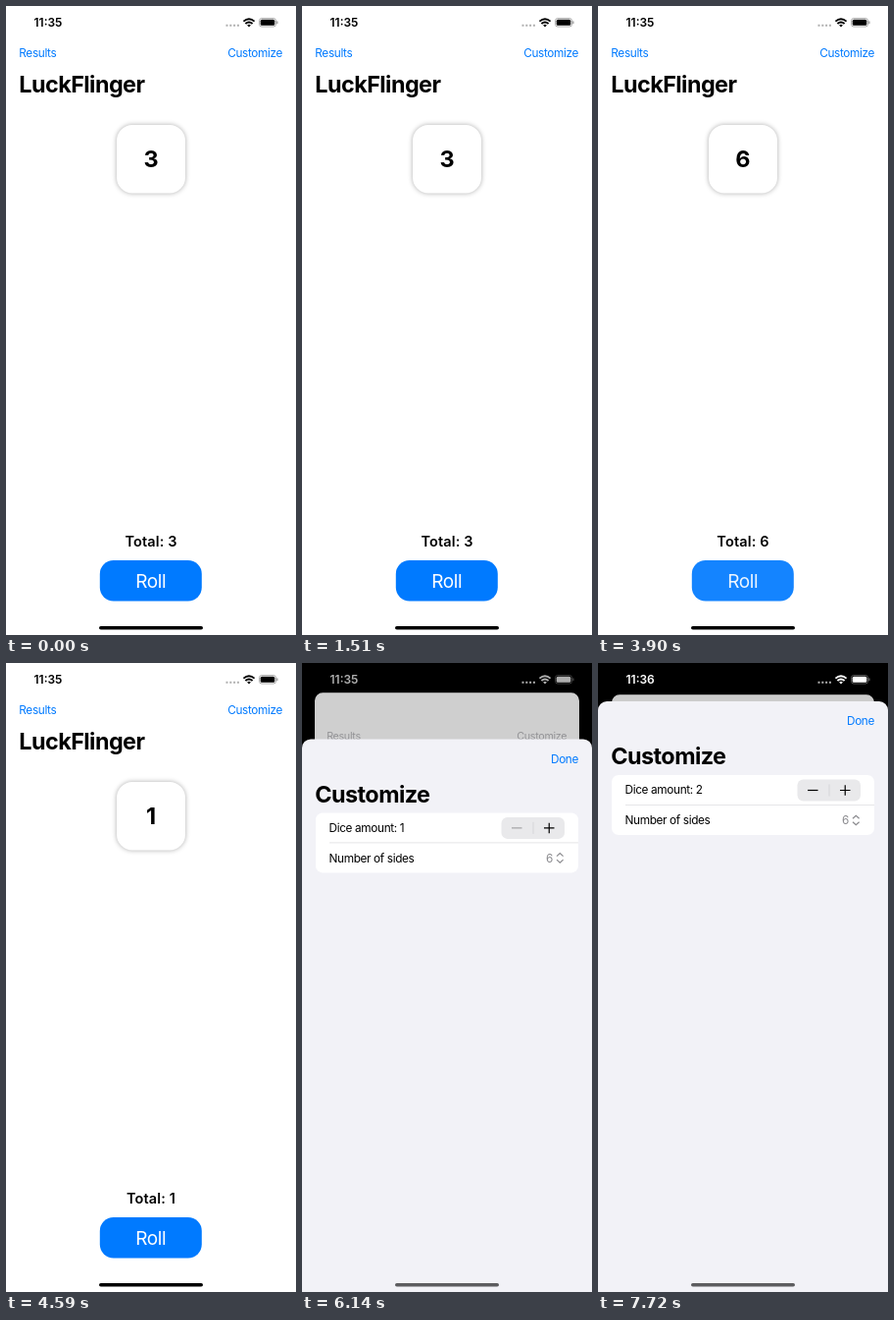
An HTML page that plays this animation: 296 by 640 pixels, repeating every 8 s.

```html
<!DOCTYPE html>
<html lang="en">
<head>
<meta charset="utf-8">
<title>Dice</title>
<style>
  html, body { margin: 0; height: 100%; overflow: hidden; background: #000; }
  svg { display: block; width: 100vw; height: 100vh; }
  text { font: 11.8px Inter, sans-serif; letter-spacing: -.03em; white-space: pre; }
  .title { font-size: 23.4px; font-weight: 700; letter-spacing: -.024em; }
  .mid { text-anchor: middle; }
  .end { text-anchor: end; }
  .link { fill: #007aff; }
  #die { filter: drop-shadow(0 0 2.6px rgba(0, 0, 0, .33)); }
  #value { font-size: 23.5px; font-weight: 700; letter-spacing: 0; }
  #total { font-size: 14.5px; font-weight: 600; letter-spacing: .01em; }
  #roll text { font-size: 19px; letter-spacing: -.02em; }
  #clock { font-size: 12px; font-weight: 600; letter-spacing: 0; }
  .line { fill: none; stroke: #000; stroke-width: 1.2; }
</style>
</head>
<body>
<svg viewBox="0 0 296 640">
  <g id="page">
    <rect id="paper" width="296" height="640" fill="#fff"/>
    <text class="link" id="results" x="13.3" y="52.4">Results</text>
    <text class="link end" id="customize" x="282" y="52.4">Customize</text>
    <text class="title" x="13.3" y="88.3">LuckFlinger</text>
    <rect id="die" x="113" y="121" width="70" height="69.5" rx="16" fill="#fff"/>
    <text class="mid" id="value" x="148" y="163.7"></text>
    <text class="mid" id="total" x="148" y="550.2"></text>
    <g id="roll">
      <rect x="95.8" y="564" width="104" height="41.5" rx="14" fill="#007aff"/>
      <text class="mid" x="147.8" y="591.7" fill="#fff">Roll</text>
    </g>
    <rect id="dim" width="296" height="640"/>
  </g>

  <g id="sheet">
    <path d="M0 640V48a9 9 0 0 1 9-9H287a9 9 0 0 1 9 9V640z" fill="#f2f2f7"/>
    <text class="link end" x="282" y="63.4">Done</text>
    <text class="title" x="13.3" y="103.3">Customize</text>
    <rect x="14" y="114" width="268" height="61" rx="7" fill="#fff"/>
    <path d="M28 144.5H282" stroke="#dcdcde" stroke-width=".7"/>
    <text id="amount" x="27.5" y="133.4"></text>
    <text x="27.5" y="164.2">Number of sides</text>
    <rect x="203.5" y="118.5" width="64.5" height="22" rx="6" fill="#e9e9eb"/>
    <path id="press" d="M236 118.5h26a6 6 0 0 1 6 6v10a6 6 0 0 1-6 6h-26z" fill="#b8b8bc"/>
    <path d="M236 123.5v12" stroke="#d0d0d3" stroke-width=".8"/>
    <path class="line" id="minus" d="M214 129.5h10.5"/>
    <path class="line" d="M247 129.5h10.5M252.25 124.25v10.5"/>
    <text class="end" x="256" y="164.2" fill="#8a8a8e">6</text>
    <path class="line" d="M260 158.3l3.3-3 3.3 3M260 161.7l3.3 3 3.3-3" style="stroke:#8a8a8e"/>
  </g>

  <g id="status" fill="currentColor">
    <text id="clock" x="28.5" y="21.2"></text>
    <path d="M224.5 19.7H238" stroke="#b0b0b0" stroke-width="2" stroke-dasharray="2 1.8"/>
    <path d="M242.4 15.6q5.6-4.8 11.2 0M244.4 17.9q3.6-3 7.2 0" fill="none" stroke="currentColor" stroke-width="1.9"/>
    <path d="M246.1 19.5q1.9-1.4 3.800 0l-1.900 1.900z"/>
    <rect x="258.5" y="12.5" width="17" height="8.5" rx="2.5" fill="none" stroke="currentColor" stroke-opacity=".4" stroke-width=".8"/>
    <rect x="259.7" y="13.7" width="14.6" height="6.1" rx="1.5"/>
    <rect x="276.4" y="15.3" width="1" height="3" rx=".5" opacity=".5"/>
  </g>
  <rect id="home" x="95" y="631" width="106" height="3.5" rx="1.75"/>
</svg>

<script>
const LOOP = 8000;
const $ = id => document.getElementById(id);

// Latest value whose start time has passed
const at = (t, steps) => steps.reduce((v, [start, next]) => t >= start ? next : v, steps[0][1]);

const FACES = [
  [0, 3], [610, 4], [720, 2], [830, 6], [930, 5], [1100, 1], [1300, 4], [1400, 6], [1510, 3],
  [3660, 5], [3780, 2], [3890, 6], [4010, 4], [4190, 2], [4390, 5], [4590, 1]
];
const BUTTON = [
  [0, 1], [500, .2], [610, .52], [720, .75], [830, .92], [930, 1],
  [3560, .2], [3660, .52], [3780, .75], [3890, .92], [4010, 1]
];
const SHEET_TIMES = [5910, 6140, 6260, 6420];
const SHEET_START = 5880;

function drawSheet(t) {
  const open = t >= SHEET_TIMES[0];
  const held = at(t, SHEET_TIMES.map(s => [s, s])) - SHEET_START;
  // Critically damped spring
  const w = held * .0171;
  const rest = held > 500 ? 0 : (1 + w) * Math.exp(-w);
  const p = open ? 1 - rest : 0;
  const light = open ? Math.round(255 * Math.min(1, held / 380)) : 0;

  $('sheet').style.display = open ? '' : 'none';
  $('sheet').setAttribute('transform', `translate(0 ${601 * (1 - p)})`);
  $('page').setAttribute('transform', `translate(${13.9 * p} ${32.3 * p}) scale(${1 - .094 * p})`);
  for (const id of ['paper', 'dim']) $(id).setAttribute('rx', open ? 9 : 0);
  $('dim').style.opacity = .2 * p;
  $('status').style.color = `rgb(${light},${light},${light})`;
  $('home').style.fill = open ? '#5c5c5f' : '#000';
  $('results').style.fill = $('customize').style.fill = open ? '#b4b4b8' : '';
  $('customize').style.opacity = t >= 5770 && !open ? .2 : 1;
}

function draw(t) {
  const face = at(t, FACES);
  const count = t < 7470 ? 1 : 2;
  const alpha = at(t, BUTTON);
  $('value').textContent = face;
  $('total').textContent = `Total: ${face}`;
  for (const part of $('roll').children) part.style.opacity = alpha;
  drawSheet(t);
  $('clock').textContent = t < 7190 ? '11:35' : '11:36';
  $('amount').textContent = `Dice amount: ${count}`;
  $('minus').style.stroke = count > 1 ? '#000' : '#a2a2a5';
  $('press').style.opacity = at(t, [[0, 0], [7470, .6], [7600, .3], [7720, 0]]);
}

function tick() {
  draw(performance.now() % LOOP);
  requestAnimationFrame(tick);
}
tick();
</script>
</body>
</html>
```
